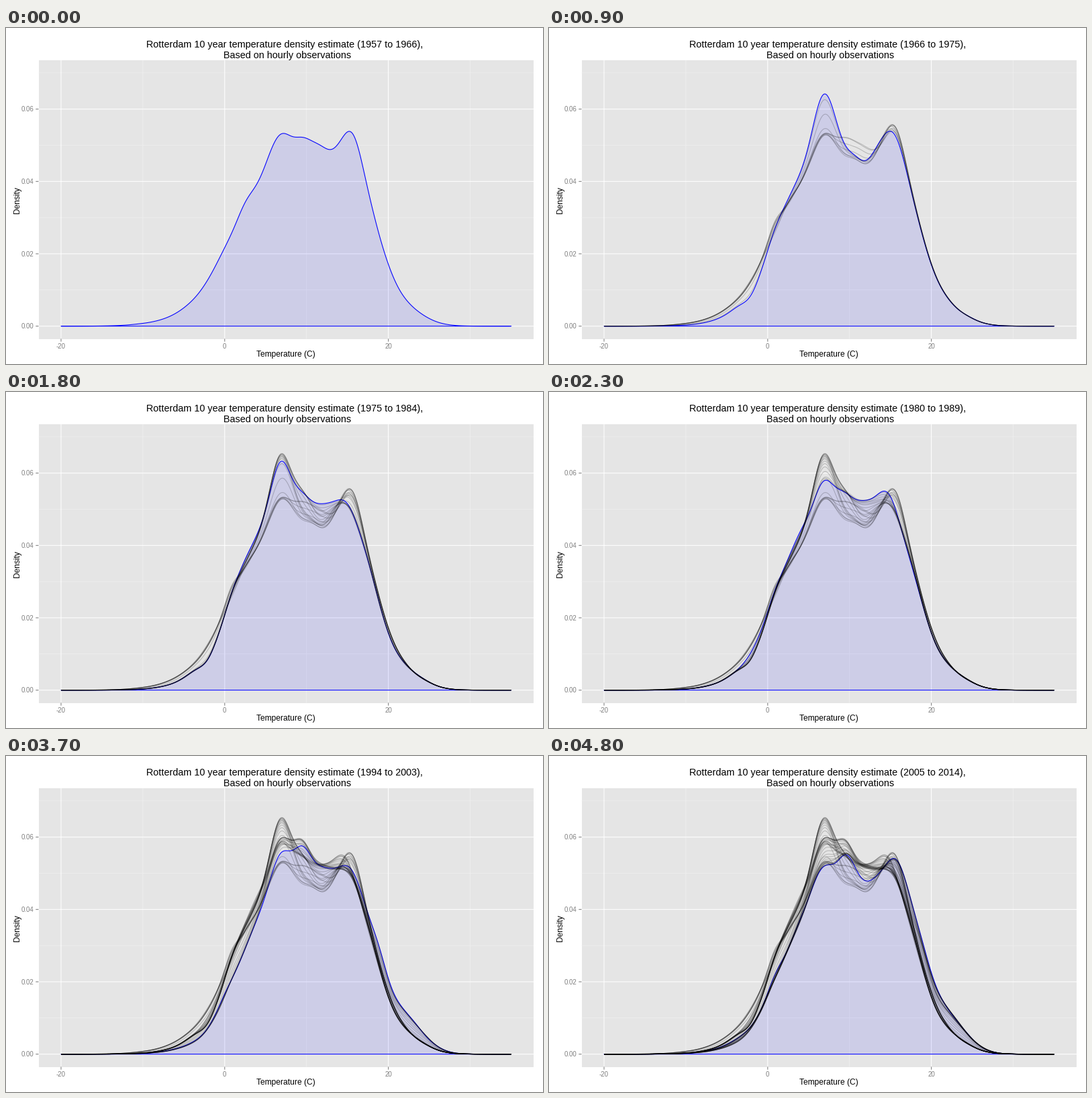
These frames come from a looping animation (800x500 px, 4.9 s). A matplotlib script:

```python
import numpy as np
import matplotlib.pyplot as plt
from matplotlib.animation import FuncAnimation
from matplotlib.collections import LineCollection
from matplotlib.patches import Polygon, Rectangle

W, H, DPI = 800, 500, 72
FRAMES, STEP = 49, 100
FIRST_YEAR, SPAN = 1957, 10
GRAY = "#7f7f7f"
LEFT, RIGHT, TOP, BOTTOM = 48.5, 786, 48, 462.5

plt.rcParams["font.family"] = "Liberation Sans"

temps = np.linspace(-20, 35, 512)


def px(temp):
    return 325.8 + 12.19 * temp


def py(density):
    return 443.66 - 5383 * density


def track(t, start, *moves):
    """Value at t after eased moves, each (change, from, to)."""
    for change, a, b in moves:
        u = np.clip((t - a) / (b - a), 0, 1)
        start += change * u * u * (3 - 2 * u)
    return start


def rise(mid, width):
    return 1 / (1 + np.exp((mid - temps) / width))


def bump(mid, width):
    return np.exp(-((temps - mid) / width) ** 2)


# Every year has its own weather; each window averages ten of them
rng = np.random.default_rng(7)
spots = np.arange(-20, 36, 1.5)
ripples = np.array([bump(s, 1.3) for s in spots])
weather = rng.normal(0, 0.03, (FRAMES + SPAN, len(spots))) @ ripples


def curve(t):
    """Outline of the window t years after the first, in stage pixels."""
    cold = track(t, 0.8, (1.1, 23, 31))
    spread = track(t, 2.65, (-0.45, 5, 9), (0.15, 31, 43))
    hot = track(t, 18.75, (-0.15, 9, 13), (0.6, 23, 43))
    frost = track(t, 0, (-25, 6, 9), (20, 18, 23))
    thaw = track(t, 0, (32, 0, 4), (-22, 6, 9), (10, 43, 48))
    cool = track(t, 60, (90, 5, 9), (-65, 16, 23), (40, 23, 30), (-65, 32, 42))
    mild = track(t, 25, (-45, 0, 5), (55, 9, 13), (45, 23, 29), (-25, 32, 43))
    dip = track(t, 0, (-50, 0, 5), (60, 9, 20), (-35, 43, 48))
    warm = track(t, 85, (15, 0, 4), (-65, 5, 13), (45, 16, 23),
                 (-60, 23, 30), (50, 32, 43))
    crest = track(t, 15.5, (-0.8, 9, 23), (1.0, 32, 43))
    tail = track(t, 27, (30, 23, 31))

    base = rise(cold, spread) * (1 - rise(hot, 1.5))
    d = (515 * base + frost * bump(-2, 1.4) + thaw * bump(0.8, 1.2)
         + cool * bump(6.8, 1.8) + mild * bump(9.5, 1.4)
         + dip * bump(12, 1.6) + warm * bump(crest, 1.7)
         + tail * bump(22.5, 3.2))
    d *= 1 + weather[t:t + SPAN].mean(axis=0) * (3 - 2 * base)
    # The tails die out at both ends of the scale
    d *= 1 - np.exp(-((temps + 20) / 7) ** 2) - np.exp(-((temps - 35) / 4) ** 2)
    return np.column_stack([px(temps), py(np.maximum(d, 0) * 1e-4)])


curves = [curve(t) for t in range(FRAMES)]

fig = plt.figure(figsize=(W / DPI, H / DPI), dpi=DPI, facecolor="white")
ax = fig.add_axes([0, 0, 1, 1])
ax.set_xlim(0, W)
ax.set_ylim(H, 0)
ax.axis("off")


def rule(xs, ys, color, lw=1.07):
    ax.plot(xs, ys, color=color, lw=lw, solid_capstyle="butt",
            snap=False, zorder=1)


def label(x, y, text, size, color="black", ha="center", **kw):
    return ax.text(x, y, text, fontsize=size, color=color, ha=ha,
                   va="baseline", **kw)


ax.add_patch(Rectangle((LEFT, TOP), RIGHT - LEFT, BOTTOM - TOP,
                       fc="#e5e5e5", ec="none", zorder=0))
for t in (-10, 10, 30):
    rule([px(t)] * 2, [TOP, BOTTOM], "#f2f2f2", 0.6)
for d in (0.01, 0.03, 0.05, 0.07):
    rule([LEFT, RIGHT], [py(d)] * 2, "#f2f2f2", 0.6)
for d in (0, 0.02, 0.04, 0.06):
    rule([LEFT, RIGHT], [py(d)] * 2, "white")
    rule([LEFT - 4.2, LEFT], [py(d)] * 2, GRAY)
    label(41.8, py(d) + 3.5, f"{d:.2f}", 9.6, GRAY, "right")
for t in (-20, 0, 20):
    rule([px(t)] * 2, [TOP, BOTTOM], "white")
    rule([px(t)] * 2, [BOTTOM, BOTTOM + 4.2], GRAY)
    label(px(t), 477.3, str(t), 9.6, GRAY)

label(417.3, 489, "Temperature (C)", 12)
label(20, 255.5, "Density", 12, rotation=90, rotation_mode="anchor")
title = label(415.3, 29, "", 14.4)
label(419.5, 45, "Based on hourly observations", 14.4)

fill = Polygon(curves[0], closed=True, fc=(0, 0, 1, 0.1), ec="blue",
               lw=1.07, joinstyle="round", zorder=2)
ax.add_patch(fill)
past = LineCollection([], colors=[(0, 0, 0, 0.2)], linewidths=1.07, zorder=3)
ax.add_collection(past, autolim=False)


def draw(i):
    year = FIRST_YEAR + i
    title.set_text("Rotterdam 10 year temperature density estimate "
                   f"({year} to {year + SPAN - 1}),")
    fill.set_xy(curves[i])
    past.set_segments(curves[:i])
    return title, fill, past


anim = FuncAnimation(fig, draw, frames=FRAMES, interval=STEP,
                     repeat=True, repeat_delay=0, blit=False)
plt.show()
```
